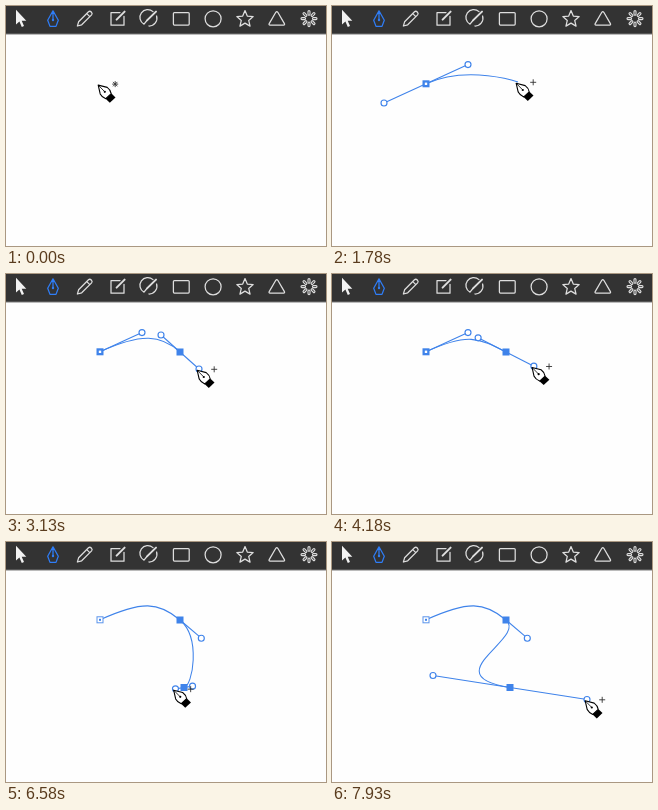
An HTML page that plays this animation: 320 by 240 pixels, repeating every 8000 ms.

```html
<!DOCTYPE html>
<html lang="en">
<head>
<meta charset="utf-8">
<title>Pen tool</title>
<style>
  html, body { margin: 0; width: 100%; height: 100%; overflow: hidden; background: #fff; }
  svg { display: block; width: 100vw; height: 100vh; }
  .icon { fill: none; stroke: #dedede; stroke-width: 1.25; stroke-linejoin: round; stroke-linecap: round; }
  .path { fill: none; stroke: #3f83ea; stroke-width: 1.05; }
  .knob { fill: #fff; stroke: #3f83ea; stroke-width: 1.15; }
</style>
</head>
<body>
<svg viewBox="0 0 320 240">
  <rect width="320" height="240" fill="#fefefe"/>
  <rect width="320" height="29" fill="#bbb"/>
  <rect width="320" height="28" fill="#555"/>
  <rect width="320" height="27" fill="#333"/>
  <g class="icon">
    <path d="M10 3.7V18.6L13.4 15.5L15.8 21L18 20L15.7 14.7H20.3Z" fill="#f2f2f2" stroke="none"/>
    <g stroke="#2f7df6">
      <path d="M47 4.8L41.7 14.2L44 20.4H50L52.3 14.2ZV13"/>
      <circle cx="47" cy="14" r="1.2" fill="#2f7df6" stroke="none"/>
    </g>
    <path d="M71.4 20L72.6 15.8L82.5 5.8Q83.8 4.6 85.3 6Q86.8 7.6 85.6 8.9L75.7 18.8ZM80.8 7.6L83.8 10.6"/>
    <path d="M114 6.6H105V19.2H118V10.3"/>
    <path d="M110.6 13.6L118.6 5.6" stroke-width="2"/>
    <path d="M147 5.6A7.8 7.8 0 1 0 138 18.2L140.5 15M150.6 10A7.8 7.8 0 0 1 143 20"/>
    <path d="M141 14.4L150 5.6" stroke-width="2"/>
    <rect x="167.4" y="6.5" width="15.8" height="12.6" rx="1"/>
    <circle cx="207.1" cy="12.8" r="8"/>
    <path id="star"/>
    <path d="M269.8 6.3Q270.8 4.9 271.8 6.3L278.4 17.6Q279 19 277.6 19H264Q262.6 19 263.2 17.6Z"/>
    <g id="burst" stroke-width="1.1"></g>
  </g>
  <g id="art"></g>
  <g id="cursor">
    <path d="M0 0L9 2.3Q12.2 4.5 13 8.6L7.6 13.6Q3.6 12 2 8.8Z" fill="#fff" stroke="#000" stroke-width="1.1" stroke-linejoin="round"/>
    <path d="M0 0L6.4 6.5" stroke="#000" stroke-width=".8"/>
    <circle cx="6.6" cy="6.7" r="1.1"/>
    <path d="M7.4 13.7L13.3 8.4L17.3 12.3L11.6 17.6Z"/>
    <path id="badge" stroke="#333" stroke-width=".9"/>
  </g>
</svg>
<script>
const LOOP = 8000;
const get = id => document.getElementById(id);
const lerp = (p, q, f) => p.map((v, i) => v + (q[i] - v) * f);
const mirror = (p, center) => lerp(p, center, 2);
const ease = f => (1 - Math.cos(Math.PI * f)) / 2;
const repeat = (n, make) => Array.from({ length: n }, (_, i) => make(i));

get('star').setAttribute('d', 'M' + repeat(10, i => {
  const r = i % 2 ? 3.9 : 8.6, a = i * Math.PI / 5;
  return [239 + r * Math.sin(a), 13.2 - r * Math.cos(a)];
}).join('L') + 'Z');
get('burst').innerHTML = repeat(8, i =>
  `<rect x="302" y="4.6" width="2" height="4.6" rx="1" transform="rotate(${i * 45} 303 12.6)"/>`).join('');

const first = [94, 77.8], second = [174, 78], third = [178, 145.5];
const firstOut = [136, 58.6], secondOut = [195.3, 96.2];

// Steps at which the tool starts a new phase.
const PRESS_FIRST = 1, TO_SECOND = 9, PRESS_SECOND = 17, TO_THIRD = 33, PRESS_THIRD = 43;

const moves = [
  { from: 0, to: 7, at: firstOut },
  { from: 8, to: 12, at: [186, 76] },
  { from: 12, to: 16, at: second },
  { from: 16, to: 21, at: [193, 95] },
  { from: 22, to: 24, at: [203, 91.5] },
  { from: 27, to: 31, at: secondOut },
  { from: 32, to: 36, at: [180, 143] },
  { from: 42, to: 49, at: [124, 163.5] },
  { from: 49, to: 53, at: [255, 157.5] }
];

const stepAt = t => Math.floor((t + (t < 890 ? 0 : t < 1780 ? 10 : 20)) / 150);

const pointerAt = step => moves
  .filter(m => m.from < step)
  .reduce((p, m) => lerp(p, m.at, ease(Math.min(1, (step - m.from) / (m.to - m.from)))), first);

const curve = (...p) => `<path class="path" d="M${p[0]}C${p.slice(1).join(' ')}"/>`;
const handle = (anchor, p) =>
  `<path class="path" d="M${anchor}L${p}"/><circle class="knob" cx="${p[0]}" cy="${p[1]}" r="3"/>`;
const handles = (anchor, p) => handle(anchor, mirror(p, anchor)) + handle(anchor, p);
const box = ([x, y], size, fill, stroke = 'none') =>
  `<rect x="${x - size / 2}" y="${y - size / 2}" width="${size}" height="${size}" fill="${fill}" stroke="${stroke}"/>`;
const anchor = p => box(p, 7, '#3f83ea');
const startAnchor = active => active
  ? anchor(first) + box(first, 2.4, '#fff')
  : box(first, 6, '#fff', '#5b94ec') + box(first, 2, '#3f83ea');

function drawFirst(step, pos) {
  if (step < PRESS_FIRST) return '';
  const dragging = step < TO_SECOND;
  return (dragging ? '' : curve(first, firstOut, pos, pos)) +
    handles(first, dragging ? pos : firstOut) + startAnchor(true);
}

function drawSecond(step, pos) {
  const dragging = step < TO_THIRD;
  const out = dragging ? pos : secondOut;
  return curve(first, firstOut, mirror(out, second), second) +
    (dragging ? '' : curve(second, out, pos, pos)) +
    handle(first, firstOut) + handles(second, out) + startAnchor(dragging) + anchor(second);
}

const drawThird = pos =>
  curve(first, firstOut, mirror(secondOut, second), second) +
  curve(second, secondOut, mirror(pos, third), third) +
  handle(second, secondOut) + handles(third, pos) +
  startAnchor(false) + anchor(second) + anchor(third);

function render(t) {
  const step = stepAt(t);
  const pos = pointerAt(step);
  get('art').innerHTML = step < PRESS_SECOND ? drawFirst(step, pos)
    : step < PRESS_THIRD ? drawSecond(step, pos) : drawThird(pos);
  get('cursor').setAttribute('transform', `translate(${pos[0] - 1.8} ${pos[1] + 1.3})`);
  get('badge').setAttribute('d', 'M14 -1H20M17 -4V2' +
    (step < PRESS_FIRST ? 'M14.8 -3.2L19.2 1.2M19.2 -3.2L14.8 1.2' : ''));
}

const start = performance.now();
function tick() {
  render((performance.now() - start) % LOOP);
  requestAnimationFrame(tick);
}
tick();
</script>
</body>
</html>
```
